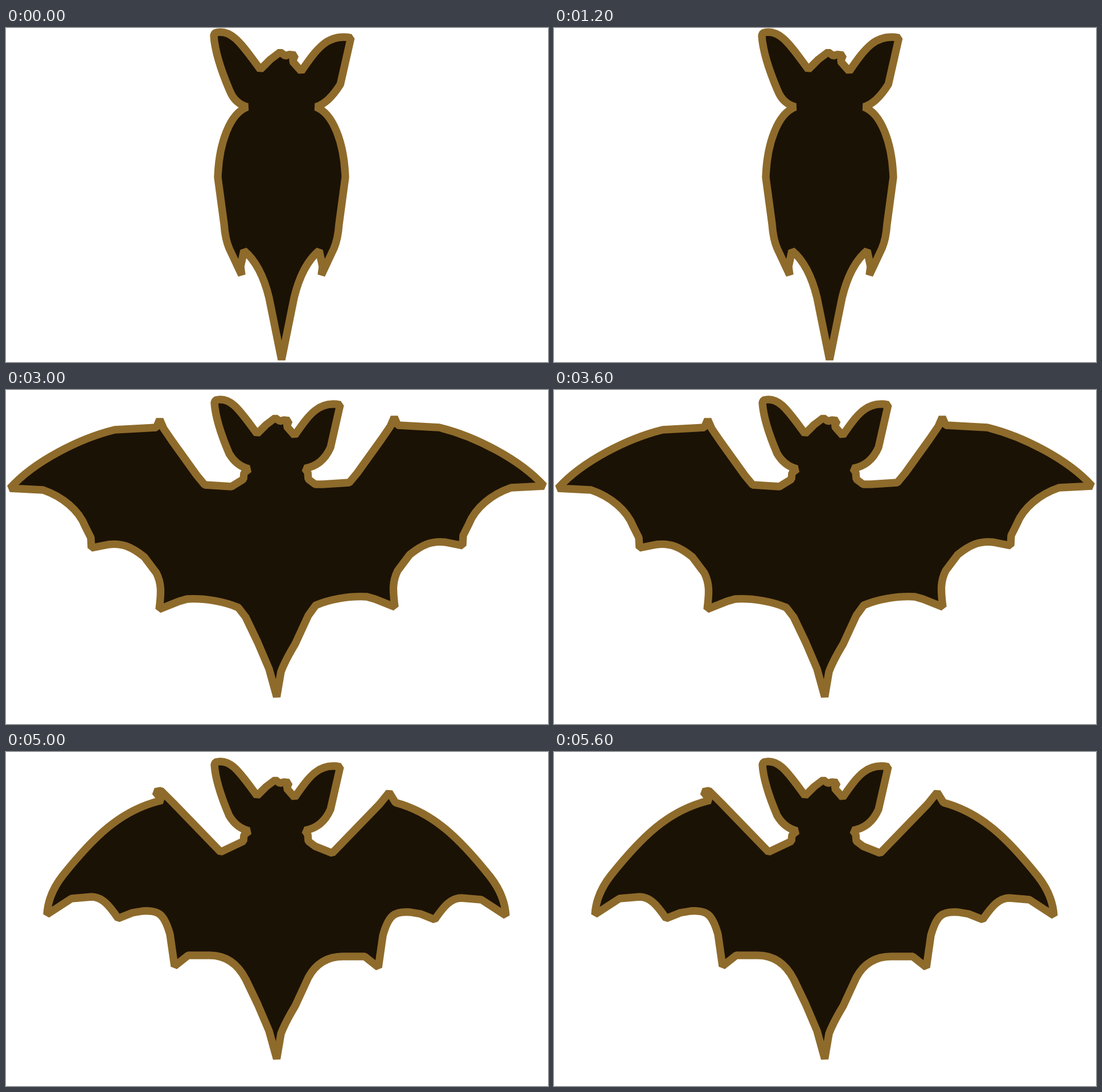
An HTML page for the animation above (6 s loop, 952 by 588 pixels).

```html
<!DOCTYPE html>
<html lang="en">
<head>
<meta charset="utf-8">
<title>Bat unfolding its wings</title>
<style>
html, body { margin: 0; width: 100%; height: 100%; overflow: hidden; background: #fff; }
svg { display: block; width: 100%; height: 100%; }
path { fill: #1b1206; stroke: #8e6b2b; stroke-width: 13.4; stroke-linejoin: bevel; }
</style>
</head>
<body>
<svg viewBox="0 0 952 588"><path id="bat"/></svg>
<script>
// Points are "x,y"; a leading ~ marks a Bézier control point.
const parse = text => text.split(' ').map(word => {
  const [x, y] = word.replace('~', '').split(',').map(Number);
  return { x, y, control: word[0] === '~' };
});
const move = (points, sx, dx, sy, dy) =>
  points.map(p => ({ ...p, x: p.x * sx + dx, y: p.y * sy + dy }));
const mirror = (points, width, dy, sy = 1) => move(points, -1, width, sy, dy);

function toPath([first, ...rest]) {
  let path = `M${first.x} ${first.y}`, controls = '', count = 0;
  for (const p of [...rest, first]) {
    const pair = `${p.x} ${p.y} `;
    if (p.control) {
      controls += pair;
      count++;
    } else {
      path += 'LQC'[count] + controls + pair;
      controls = '';
      count = 0;
    }
  }
  return path + 'Z';
}

// Both sides run from neck to tail, the tail from right to left.
const outline = (head, right, tail, left) =>
  toPath([...head, ...right, ...tail, ...left.reverse()]);

const head = parse('427,139 ~405,134 392,112 ~383,91 ~368,54 366,22 368,18 ~395,10 ~412,38 441,77 ' +
  '457,61 473,49 481,55 488,53 497,54 493,64 507,80 ~533,42 ~550,19 587,26 570,101 ~556,133 525,138');

function folded() {
  const ears = move(head.slice(2, -2), 1.09, -34, 1.09, -11);
  const base = parse('424,139 ~402,133');
  const side = parse('~393,150 ~374,203 372,263 383,345 ~385,372 392,388 414,435 412,420 418,392 ~448,417 462,475');
  const skull = [...base, ...ears, ...mirror(base, 968, 0).reverse()];
  return outline(skull, mirror(side, 968, 0), parse('484,584'), side);
}

function opening() {
  const wing = parse('374,153 356,138 ~368,118 374,102 370,98 ~340,93 321,101 279,173 ~235,260 ~222,380 254,499 ' +
    '~288,425 ~302,400 326,391 ~354,392 361,424 ~364,384 380,382 ~412,382');
  const right = [...parse('533,142 534,158 541,159'), ...mirror(wing, 968, -2, .984)];
  const left = [...parse('420,145 419,158 410,161'), ...wing];
  const tail = parse('523,407 487,490 478,539 466,490 428,400');
  return outline(move(head, 1, 2, 1, -2), right, tail, left);
}

// The body stays still while the wings beat.
const flying = (right, left) => outline(
  head,
  [...parse('530,145 531,157 543,166'), ...right],
  parse('531,397 508,447 ~490,477 483,496 475.5,540 462,491 442,444 421,400'),
  [...parse('418,146 417,157'), ...left]
);

const arm = parse('396,170 349,167 335,150');
const scallops = parse('139,240 149,260 150,278 180,272 ~205,269 ~222,277 243,294 264,322 ' +
  '~273,340 ~273,355 269,386 304,372 318,368 ~350,366 ~385,373 408,383');
const flip = points => mirror(points, 952, -4);

function spread() {
  const tip = parse('292,90 277,68 270,52 264,66 191,70 ~130,85 ~50,125 7,173 65,176 ~100,188 ~128,212');
  const wing = [...arm, ...tip, ...scallops];
  return flying(flip(wing), wing);
}

function tipsDown() {
  const right = parse('660,80 674,62 682,47 685,65 758,83 847,138 ~905,190 919,230 ~895,216 860,214 822,221 810,240');
  const left = parse('293,88 ~282,68 267,64 253,67 256,80 ~165,95 ~115,135 70,174 50,191 28,214 65,207 129,220');
  return flying([...flip(arm), ...right, ...flip(scallops)], [...arm, ...left, ...scallops]);
}

function lowered() {
  const wing = thumb => parse(`377,176 294,90 ${thumb} 266,87 ~200,105 ~155,148 100,217 ~74,250 72,286 ` +
    '115,258 150,255 ~168,255 ~180,268 197,293 222,283 240,280 ~268,278 ~278,285 288,321 ' +
    '296,377 320,358 358,358 ~399,358');
  return flying(mirror(wing('277,69'), 950, 2), wing('272,68 262,70 274,85'));
}

const poses = [folded, opening, spread, tipsDown, lowered].map(pose => pose());
const bat = document.getElementById('bat');
let shown = -1;

function draw(now) {
  const second = Math.floor(now / 1000) % 6;
  const pose = Math.max(0, second - 1); // the folded pose is held twice as long
  if (pose !== shown) bat.setAttribute('d', poses[shown = pose]);
  requestAnimationFrame(draw);
}
draw(performance.now());
</script>
</body>
</html>
```
